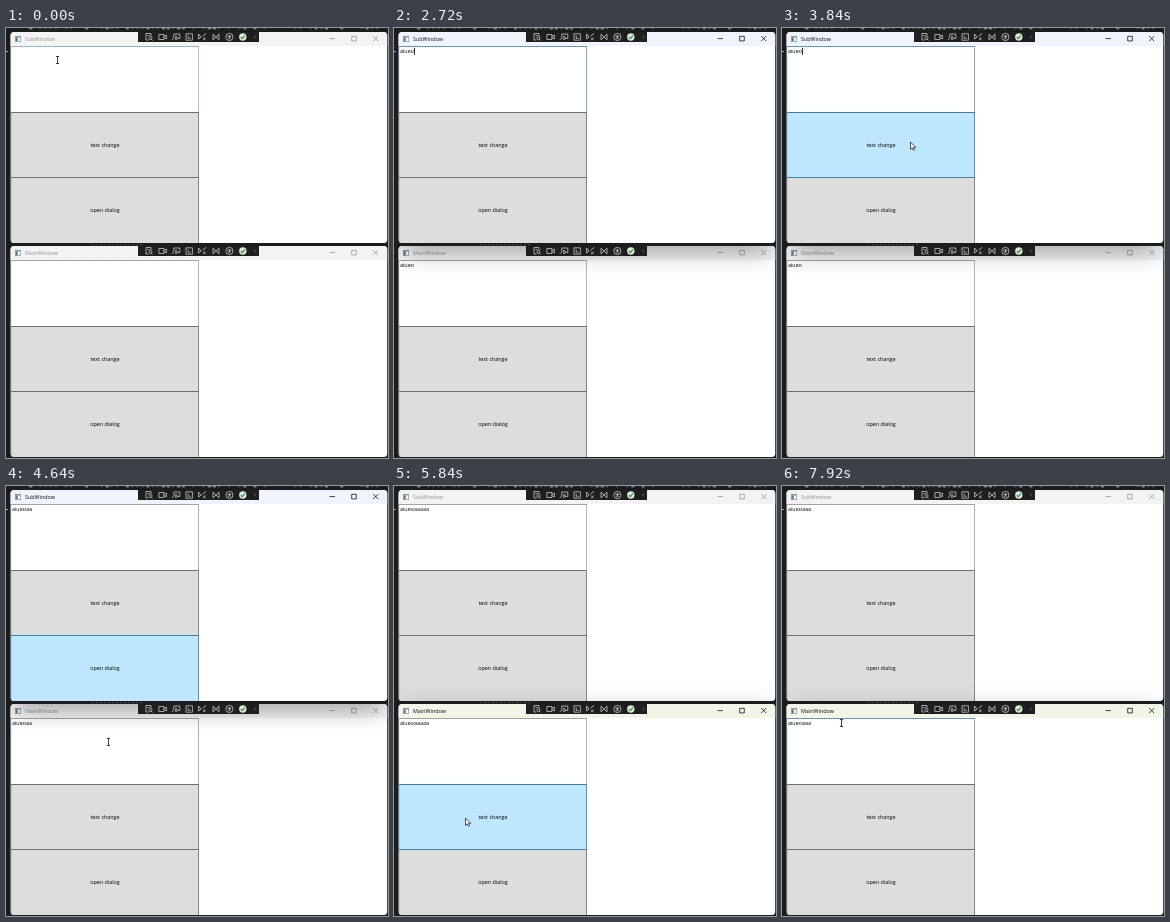
Animation of 382x430 px, one loop 8000 ms. Source, as an HTML page with a canvas:

```html
<!DOCTYPE html>
<html lang="en">
<head>
<meta charset="utf-8">
<title>Two windows</title>
<style>
html, body { margin: 0; width: 100%; height: 100%; overflow: hidden; background: #1c1c1c; }
canvas { display: block; }
</style>
</head>
<body>
<canvas id="stage" width="382" height="430"></canvas>
<script>
const ctx = document.getElementById('stage').getContext('2d');
const LOOP = 8000, TICK = 80;
const FONT = '"Open Sans", "Noto Sans", sans-serif';
const LEFT = 4.6, PANE = 188.4, WIN_W = 376.6, WIN_H = 211;
const SUB_Y = 4, MAIN_Y = 218;

// Moments when a letter is typed, a button is released, backspace is hit
const TYPED = [1280, 1920, 2160, 2320, 2720];
const CLICKS = [4080, 4480, 5280, 5520, 5760];
const ERASED = [7760, 7920];

const START = { x: 51.5, y: 32 };
const MOVES = [
  { from: 3200, to: 3520, x: 124, y: 172 },
  { from: 3520, to: 3840, x: 128.5, y: 114 },
  { from: 4560, to: 4640, x: 102.5, y: 256 },
  { from: 4640, to: 4880, x: 66.5, y: 355 },
  { from: 4880, to: 5200, x: 71.5, y: 332 },
  { from: 5840, to: 6560, x: 59.5, y: 237 }
];

const ARROW = new Path2D('M0 0V7.4L1.7 5.8 2.9 8.3 4 7.7 3 5.3H5.2Z');
const BEAM = new Path2D('M-1.6-3.5H1.6M0-3.5V3.5M-1.6 3.5H1.6');

// Tree, camera, picker, layout, focus, bindings, accessibility
const ICONS = [
  'M2-1V-3.5H-3V3H-.5M-1.5-1.5H.5M3.5 3.5L2.2 2.2M0 1a1.5 1.5 0 1 0 3 0a1.5 1.5 0 1 0-3 0',
  'M-3.5-2.5H1.5V2.5H-3.5ZM1.5-.5L4-2V2L1.5.5',
  'M-2 1V-3H4V1.5H2M0-1V3L2 1ZM-4 3L-2 1',
  'M-3.2-3.2H3.2V3.2H-3.2ZM-1-1.5V1.3H1.5',
  'M-4-3V2L-1.5 0ZM0-1L3.5-3.5M.5.5L3 3.2M.5 3.2L3 .5',
  'M-3-2.8V2.8L3-2.8V2.8Z',
  'M-3.6 0a3.6 3.6 0 1 0 7.2 0a3.6 3.6 0 1 0-7.2 0M-2-.7H2M0-2V0L-1 2.3M0 0L1 2.3'
].map(d => new Path2D(d));

const clamp = v => Math.max(0, Math.min(1, v));
const ramp = (t, from, to) => clamp((t - from) / (to - from));
const ease = p => p * p * (3 - 2 * p);
const count = (times, t) => times.filter(s => t >= s).length;
const mix = (a, b, p) => `rgb(${a.map((v, i) => Math.round(v + (b[i] - v) * p))})`;

function pointerAt(t) {
  return MOVES.reduce((pos, m) => {
    const p = ease(ramp(t, m.from, m.to));
    return { x: pos.x + (m.x - pos.x) * p, y: pos.y + (m.y - pos.y) * p };
  }, START);
}

function rect(x, y, w, h, color) {
  ctx.fillStyle = color;
  ctx.fillRect(x, y, w, h);
}

function shape(path, x, y, stroke, width = 0.7, fill) {
  ctx.save();
  ctx.translate(x, y);
  if (fill) {
    ctx.fillStyle = fill;
    ctx.fill(path);
  }
  ctx.strokeStyle = stroke;
  ctx.lineWidth = width;
  ctx.stroke(path);
  ctx.restore();
}

const mark = (d, x, y, color, width) => shape(new Path2D(d), x, y, color, width);

// Filled box with a thin side border and a crisp one-pixel top edge
function box(y, h, fill, edge) {
  rect(LEFT, y, PANE, h, edge);
  rect(LEFT + 0.6, y + 1, PANE - 1.4, h - 1, fill);
}

function label(s, x, y, color, align = 'left', weight = 500) {
  ctx.font = `${weight} 5.4px ${FONT}`;
  ctx.textAlign = align;
  ctx.fillStyle = color;
  ctx.fillText(s, x, y);
}

function desktop() {
  rect(0, 0, 382, 430, '#1c1c1c');
  // Slivers of editor text peeking out behind the windows
  for (let i = 0; i < 70; i++) {
    const r = Math.abs(Math.sin(i * 12.9898) * 43758.5453) % 1;
    if (r > 0.35) rect(18 + i * 5.1, 0, 1 + r * 2.5, 1.4, r > 0.7 ? '#888' : '#4a4a4a');
  }
  for (let x = 86; x < 136; x += 4) rect(x, 216.4, 2.2, 0.8, '#555');
  rect(0, 23, 2, 1, '#aaa');
}

function toolbar(top) {
  const y = top + 5, at = i => 143 + 13.4 * i;
  rect(132, top, 121, 10, '#1f1f1f');
  ICONS.forEach((icon, i) => shape(icon, at(i), y, '#dedede'));
  ctx.beginPath();
  ctx.arc(at(7), y, 3.7, 0, Math.PI * 2);
  ctx.fillStyle = '#dcebdc';
  ctx.fill();
  mark('M-2 .1L-.5 1.7L2.2-1.6', at(7), y, '#2f8f3e', 1.1);
  mark('M.7-1.6L-.7 0L.7 1.6', 249.2, y, '#777');
}

function captionButtons(y, color) {
  mark('M-2.7 0H2.7', 326.3, y, color, 0.8);
  mark('M-2.3-2.3H2.3V2.3H-2.3Z', 348, y, color, 0.8);
  mark('M-2.5-2.5L2.5 2.5M2.5-2.5L-2.5 2.5', 369.7, y, color, 0.8);
}

function appIcon(y) {
  rect(9, y, 6, 6, '#87949b');
  rect(9.7, y + 1.4, 4.6, 3.9, '#fafafa');
  rect(9.7, y + 1.4, 2, 3.9, '#4d7d88');
}

function outline(y) {
  ctx.beginPath();
  ctx.roundRect(LEFT, y, WIN_W, WIN_H, 3.5);
}

function button(text, y, hover, pressed) {
  const fill = pressed ? '#c4e5f6' : hover ? '#bee6fd' : '#dddddd';
  const edge = pressed ? '#2c628b' : hover ? '#3c7fb1' : '#707070';
  box(y, 66, fill, edge);
  label(text, 99, y + 35, '#000', 'center');
}

function drawWindow(w) {
  const { y } = w;
  ctx.save();
  outline(y);
  ctx.clip();
  rect(0, y, 382, WIN_H, '#fff');
  rect(0, y, 382, 14, mix([243, 243, 243], w.tint, w.active));
  appIcon(y + 4);
  label(w.title, 19, y + 8.9, mix([142, 142, 142], [10, 10, 10], w.active), 'left', 400);
  captionButtons(y + 6.6, mix([150, 150, 150], [20, 20, 20], w.active));

  box(y + 14, 67, '#fff', w.focus ? '#6594c9' : w.hover === 0 ? '#8fb4d8' : '#a0a2a8');
  label(w.text, 6, y + 21, '#000');
  if (w.caret) rect(6.2 + ctx.measureText(w.text).width, y + 15.8, 0.8, 7.2, '#000');

  button('text change', y + 80, w.hover === 1, w.pressed);
  button('open dialog', y + 145, w.hover === 2, w.pressed && w.hover === 2);
  // Shared edge follows the hovered upper button
  if (w.hover === 1) rect(LEFT, y + 145, PANE, 1, '#3c7fb1');
  ctx.restore();
}

function castShadow(from, onto, strength) {
  if (!strength) return;
  ctx.save();
  outline(onto);
  ctx.clip();
  ctx.shadowColor = `rgba(0,0,0,${0.36 * strength})`;
  ctx.shadowBlur = 24;
  ctx.shadowOffsetY = 8;
  rect(LEFT + 5, from, WIN_W - 10, WIN_H, '#000');
  ctx.restore();
}

// 0 text box, 1 and 2 buttons, -1 elsewhere
function zone({ x, y }, top) {
  const dy = y - top;
  if (x < LEFT || x > LEFT + PANE || dy < 14 || dy > WIN_H) return -1;
  return dy < 80 ? 0 : dy < 145.5 ? 1 : 2;
}

function drawPointer(pos) {
  const inText = [SUB_Y, MAIN_Y].some(top => zone(pos, top) === 0);
  if (inText) shape(BEAM, pos.x, pos.y, '#111', 0.8);
  else shape(ARROW, pos.x, pos.y, '#111', 0.7, '#fff');
}

function draw(t) {
  const pos = pointerAt(t), lag = pointerAt(t - TICK / 2);
  const shown = t < 1360 || t >= 3200;
  const held = CLICKS.some(up => t >= up - TICK && t < up);
  const extra = count(CLICKS, t) - count(ERASED, t);
  const text = 'aiueo'.slice(0, count(TYPED, t)) + 'a'.repeat(extra);
  const mainOn = ramp(t, 5120, 5440);
  const subOn = ramp(t, 0, 320) * (1 - mainOn);

  const state = (y, focus, caret) => {
    const hover = shown ? zone(lag, y) : -1;
    return { y, text, hover, focus, caret, pressed: held && hover === 1 };
  };

  desktop();
  drawWindow({
    title: 'SubWindow', tint: [239, 244, 252], active: subOn,
    ...state(SUB_Y, t >= 80 && t < 4000, t >= 800 && t < 4000)
  });
  drawWindow({
    title: 'MainWindow', tint: [243, 244, 232], active: mainOn,
    ...state(MAIN_Y, t >= 6800, t >= 7360 && t < 7920)
  });
  castShadow(SUB_Y, MAIN_Y, subOn);
  castShadow(MAIN_Y, SUB_Y, mainOn);
  toolbar(SUB_Y);
  toolbar(MAIN_Y);
  if (shown) drawPointer(pos);
}

const start = performance.now();
function tick() {
  const t = (performance.now() - start) % LOOP;
  draw(Math.floor(t / TICK) * TICK);
  requestAnimationFrame(tick);
}
tick();
</script>
</body>
</html>
```
